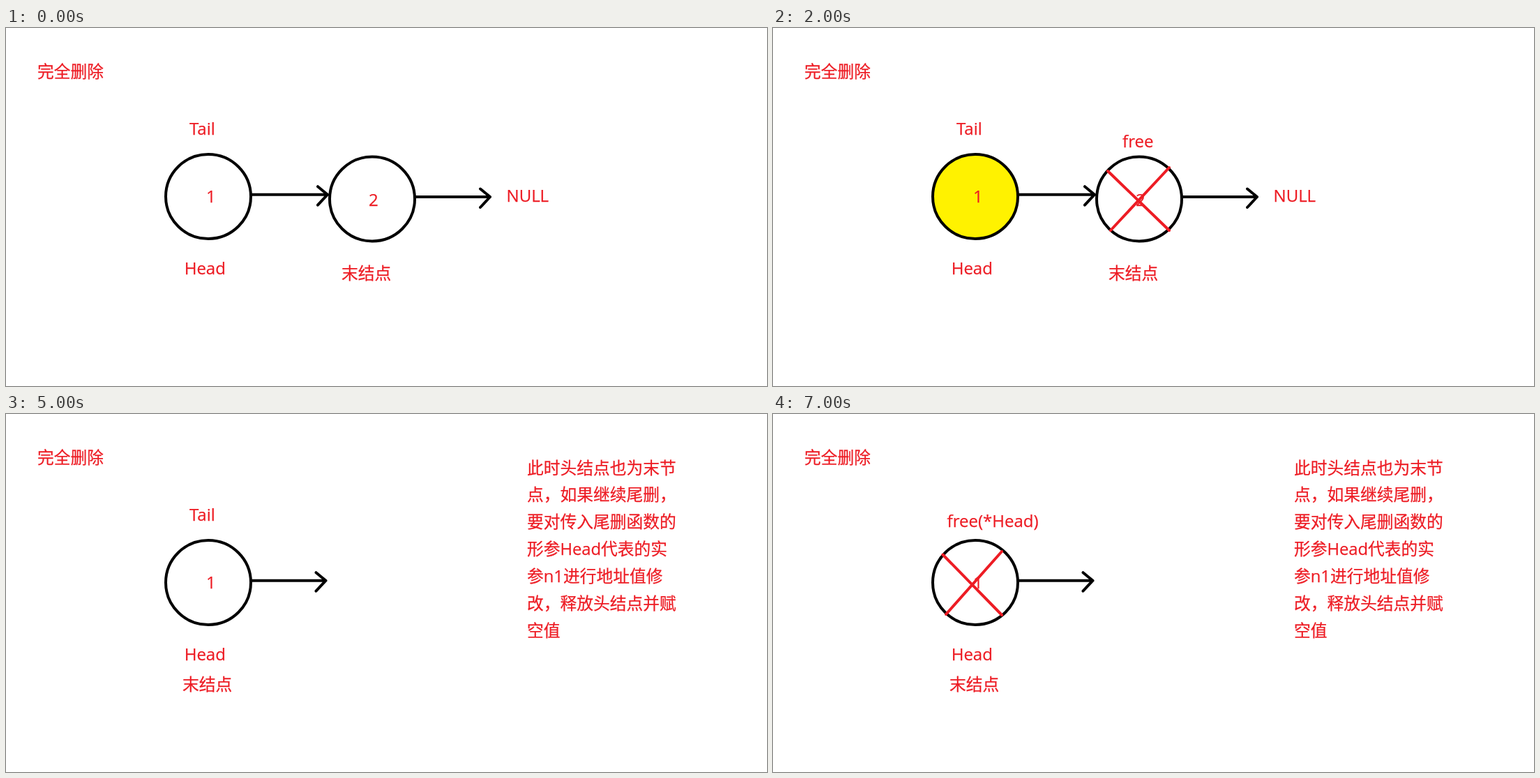
These frames come from a looping animation (1091 px wide and 513 px high, 8000 ms). An HTML page:

```html
<!DOCTYPE html>
<html lang="zh-CN">
<head>
<meta charset="utf-8">
<title>完全删除</title>
<style>
  html, body { margin: 0; width: 100%; height: 100%; overflow: hidden; background: #fff; }
  svg { display: block; width: 100%; height: 100%; }
  text {
    fill: #ed1c24; stroke: #ed1c24; stroke-width: 0.25;
    font: 24px "Open Sans", "Noto Sans CJK SC", "Noto Sans CJK", sans-serif;
  }
  .zh { font-size: 23.75px; }
  .ink { fill: none; stroke: #000; stroke-width: 4; stroke-linecap: round; stroke-linejoin: round; }
  .cross { fill: none; stroke: #ed1c24; stroke-width: 4; stroke-linecap: round; }
</style>
</head>
<body>
<svg id="stage" viewBox="0 0 1091 513"></svg>
<script>
const LOOP = 8000;
const stage = document.getElementById("stage");
const timed = [];

// Adds an element that is visible from `from` to `to` milliseconds.
function add(tag, attrs, from = 0, to = LOOP, content = "") {
  const el = document.createElementNS("http://www.w3.org/2000/svg", tag);
  for (const key in attrs) el.setAttribute(key, attrs[key]);
  el.textContent = content;
  stage.append(el);
  if (from > 0 || to < LOOP) timed.push({ el, from, to });
}

const label = (content, x, y, from, to) => add("text", { x, y }, from, to, content);
const zh = (content, x, y, from, to) => add("text", { x, y, class: "zh" }, from, to, content);
const path = (d, cls, from, to) => add("path", { d, class: cls }, from, to);
const ring = (cx, cy, from, to) =>
  add("ellipse", { cx, cy, rx: 61, ry: 60.5, class: "ink" }, from, to);
const arrow = (x, y, tip, from, to) =>
  path(`M${x} ${y}H${tip}M${tip - 14} ${y - 11.5}L${tip} ${y}L${tip - 14} ${y + 15}`, "ink", from, to);

zh("完全删除", 45, 70.7);

// First node
add("ellipse", { cx: 290, cy: 241.5, rx: 61, ry: 60.5, fill: "#fff200" }, 1000, 4000);
arrow(352, 238.7, 461, 0, 3000);
arrow(352, 238.7, 458.5, 3000);
ring(290, 241.5);
label("1", 287, 249.5);
label("Tail", 263, 152.5, 0, 6000);
label("free(*Head)", 249.5, 161.7, 6000);
label("Head", 255.7, 352.5);
path("M243.5 201.5L328 288M328 197L248 287", "cross", 7000);

// Second node
arrow(588, 242, 694, 0, 3000);
ring(525, 245, 0, 3000);
label("2", 520, 254.5, 0, 3000);
label("NULL", 717.6, 248.7, 0, 3000);
label("free", 501, 170.5, 2000, 3000);
path("M480 205L568 290M568 200L484 290", "cross", 2000, 3000);
zh("末结点", 481, 360, 0, 4000);
zh("末结点", 253, 395.5, 4000);

// Explanation
[
  "此时头结点也为末节",
  "点，如果继续尾删，",
  "要对传入尾删函数的",
  "形参Head代表的实",
  "参n1进行地址值修",
  "改，释放头结点并赋",
  "空值"
].forEach((line, i) => zh(line, 747, 85.6 + i * 38.83, 5000));

function draw(t) {
  for (const { el, from, to } of timed)
    el.style.display = t >= from && t < to ? "" : "none";
}

const start = performance.now();
function tick() {
  draw((performance.now() - start) % LOOP);
  requestAnimationFrame(tick);
}
tick();
</script>
</body>
</html>
```
